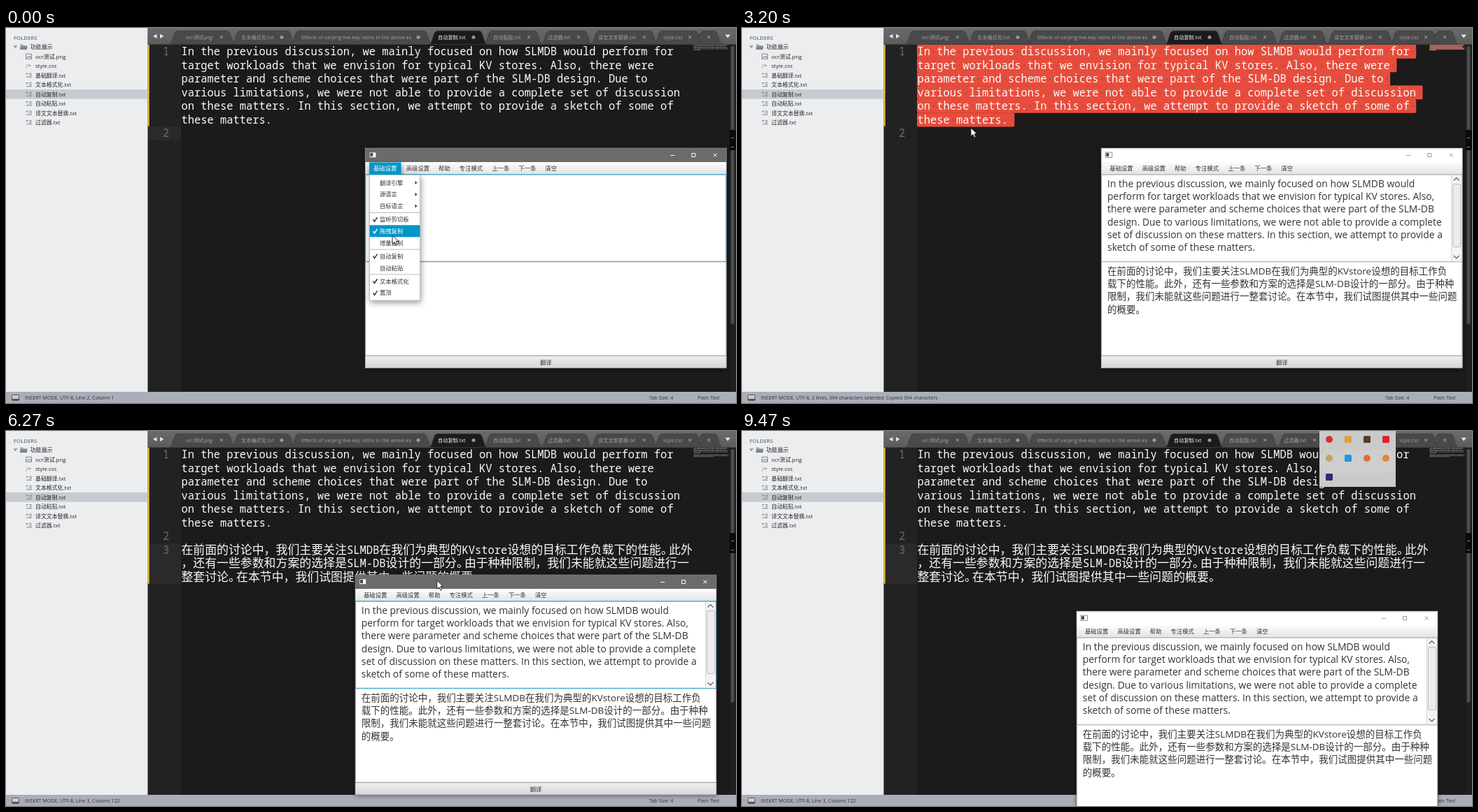
An HTML page that plays this animation: 1043 px wide and 537 px high, repeating every 9590 ms.

```html
<!DOCTYPE html>
<html lang="zh-CN">
<head>
<meta charset="utf-8">
<title>Auto copy demo</title>
<style>
html, body { margin: 0; width: 100%; height: 100%; overflow: hidden; background: #1b1b1b; }
svg { display: block; width: 1043px; height: 537px; }
text { font-family: "Open Sans", "Noto Sans CJK SC", "Noto Sans CJK JP", sans-serif; white-space: pre; }
.mono { font-family: "Noto Sans Mono", "DejaVu Sans Mono", monospace; }
.cjk { font-family: "Noto Sans CJK SC", "Noto Sans CJK JP", sans-serif; }
#win { filter: drop-shadow(0 1px 3px rgba(0,0,0,.45)); }
#menu { filter: drop-shadow(1px 3px 4px rgba(0,0,0,.4)); }
.line { fill: none; }
</style>
</head>
<body>
<svg viewBox="0 0 1043 537" xmlns="http://www.w3.org/2000/svg">
  <defs>
    <linearGradient id="bar" x2="0" y2="1"><stop stop-color="#fdfdfd"/><stop offset="1" stop-color="#e2e2e2"/></linearGradient>
    <linearGradient id="btn" x2="0" y2="1"><stop stop-color="#efefef"/><stop offset="1" stop-color="#d6d6d6"/></linearGradient>
    <linearGradient id="strip" x2="0" y2="1"><stop stop-color="#6a6a6a"/><stop offset="1" stop-color="#5c5c5c"/></linearGradient>
    <path id="stem" d="M-3-6h2q1 0 1 1v10q0 1 1 1h2M3-6h-2q-1 0-1 1M-3 6h2q1 0 1-1"/>
  </defs>

  <g id="editor">
    <rect x="203" y="23" width="840" height="498" fill="#1b1b1b"/>
    <rect x="203" y="23" width="47" height="498" fill="#222"/>
    <rect id="gutterRow" x="203" width="47" fill="#2a2a2a"/>
    <rect id="changed" x="202.5" y="24" width="2.2" fill="#e8b92e"/>
    <rect x="1034" y="23" width="9" height="498" fill="#1f1f1f"/>
    <rect id="thumb" x="1035.5" y="26" width="5" rx="2" fill="#4b4b4b"/>
    <rect x="1034" y="146" width="9" height="29" fill="#0b0b0b"/>
    <path stroke="#c8763a" d="M1036 157.5h4"/>
    <path stroke="#6f8f3a" d="M1036 170.5h4"/>
    <g id="rows"></g>
    <g id="pasted"></g>
    <rect id="caret" width="1.2" height="19" fill="#f5f5f5"/>
  </g>
  <g id="tabs"></g>
  <g id="side"></g>
  <g fill="#2e3136" font-size="7.1">
    <rect y="521" width="1043" height="16" fill="#a9aeb9"/>
    <rect x="8.5" y="525.5" width="10" height="8" rx="1" fill="#c9ccd3" stroke="#555"/>
    <rect x="9" y="531" width="9" height="2" fill="#555"/>
    <text id="status" x="27" y="532"></text>
    <text x="919" y="532">Tab Size: 4</text>
    <text x="988" y="532">Plain Text</text>
  </g>

  <g id="win">
    <rect width="516" height="315" fill="#fff"/>
    <rect id="title" width="516" height="20"/>
    <rect x="6" y="6" width="9.5" height="7.5" fill="#fff" stroke="#777" stroke-width=".8"/>
    <rect x="7" y="7" width="4" height="5" fill="#3d5560"/>
    <path id="buttons" class="line" d="M436 10.5h6M466.5 7.5h5v5h-5zM497.5 7.5l5 5m0-5l-5 5"/>
    <rect y="20" width="516" height="18" fill="url(#bar)"/>
    <g id="menubar"></g>
    <rect x=".5" y="163" width="515" height="134" class="line" stroke="#c4c4c4"/>
    <rect id="field" x=".5" y="37.8" width="515" height="124.5" class="line"/>
    <g font-size="13.5" fill="#b3b3b3">
      <text id="hintTop" x="8.8" y="56.5">原文</text>
      <text id="hintLow" x="8.8" y="181">译文</text>
    </g>
    <g id="before"></g>
    <g id="after"></g>
    <rect id="inputCaret" x="8.6" y="41.5" width="1" height="18.5" fill="#222"/>
    <rect y="297.5" width="516" height="17.5" fill="url(#btn)"/>
    <path stroke="#a5a5a5" d="M0 297.5h516"/>
    <text x="258" y="309.5" font-size="8.4" fill="#333" text-anchor="middle">翻译</text>
    <rect width="516" height="315" class="line" stroke="#8a8a8a" stroke-opacity=".7"/>
  </g>
  <g id="menu"></g>
  <g id="tray"></g>
  <path id="arrow" d="M0 0v12.200l3-2.700 2 4.500 2-1-2-4.300h4z" fill="#fff" stroke="#111" stroke-width=".9"/>
  <g id="beam" fill="none">
    <use href="#stem" stroke="#111" stroke-width="2.2"/>
    <use href="#stem" stroke="#fff"/>
  </g>
</svg>
<script>
const LOOP = 9590, TICK = 1000 / 15, PITCH = 19.55, CHAR = 9.257, LEFT = 250.4;
const $ = id => document.getElementById(id);
const txt = (x, y, size, fill, s, more = '') =>
  `<text x="${x}" y="${y}" font-size="${size}" fill="${fill}" xml:space="preserve" ${more}>${s}</text>`;
const box = (x, y, w, h, fill, more = '') =>
  `<rect x="${x}" y="${y}" width="${w}" height="${h}" fill="${fill}" ${more}/>`;
const path = (d, stroke, more = '') => `<path d="${d}" fill="none" stroke="${stroke}" ${more}/>`;
const rowTop = i => 24 + PITCH * i;
const base = i => rowTop(i) + 15;
const mapTop = i => 24 + 1.42 * i;

// Editor text
const rows = [
  'In the previous discussion, we mainly focused on how SLMDB would perform for ',
  'target workloads that we envision for typical KV stores. Also, there were ',
  'parameter and scheme choices that were part of the SLM-DB design. Due to ',
  'various limitations, we were not able to provide a complete set of discussion ',
  'on these matters. In this section, we attempt to provide a sketch of some of ',
  'these matters. '
];
const code = (x, i, fill, s) => txt(x, base(i), 15.43, fill, s, 'class="mono"');
const words = (row, i) => [...row.matchAll(/\S+/g)]
  .map(m => box(982.5 + m.index * .64, mapTop(i), m[0].length * .64, .8, '#777')).join('');
const number = (n, i) => code(224, i, '#6c6c6c', n);

$('rows').innerHTML = rows.map((row, i) =>
  `<g class="sel">${box(250, rowTop(i) - .3, row.length * CHAR + .4, PITCH + .4, '#e74c3c', 'rx="2"')}` +
  code(LEFT, i, '#8a5048', row.replace(/./g, c => c === ' ' ? '·' : ' ')) +
  box(982.5, mapTop(i) - .3, row.length * .64, 1.42, '#e0604f') + '</g>' +
  code(LEFT, i, '#fafafa', row) + words(row, i)
).join('') + number(1, 0) + number(2, 6) + `<g id="third">${number(3, 7)}</g>`;

const pasted = [
  '在前面的讨论中，我们主要关注SLMDB在我们为典型的KVstore设想的目标工作负载下的性能。此外',
  '，还有一些参数和方案的选择是SLM-DB设计的一部分。由于种种限制，我们未能就这些问题进行一',
  '整套讨论。在本节中，我们试图提供其中一些问题的概要。'
];
$('pasted').innerHTML = pasted.map((line, n) => {
  const i = n + 7;
  let x = LEFT, out = '';
  for (const [run] of line.matchAll(/[\w-]+|。|[^\w。-]+/g)) {
    const latin = /\w/.test(run);
    out += latin ? code(x, i, '#fafafa', run) : txt(x, base(i), 16.9, '#fafafa', run, 'class="cjk"');
    x += latin ? run.length * CHAR : run === '。' ? 11 : run.length * 16.9;
  }
  return out + path(`M982.5 ${mapTop(i)}h${(x - LEFT) * .068}`, '#777', 'stroke-width=".8" stroke-dasharray="9 .6"');
}).join('');

// Tabs: left edge, label x, label, mark x, unsaved
const tabs = [
  [234, 257, 'ocr测试.png', 308], [323, 336, '文本格式化.txt', 394, true],
  [407, 422, 'Effects of varying live-key ratios In the above ex', 589, true],
  [683, 696, '自动粘贴.txt', 747], [765, 774, '过滤器.txt', 818],
  [836, 846, '译文文本替换.txt', 912], [985, 990, '~', 1004],
  [926, 939, 'style.css', 977], [605, 617, '自动复制.txt', 668, true]
];
$('tabs').innerHTML = box(203, 0, 840, 23.5, 'url(#strip)') +
  '<path d="M215.500 8.500v6.500l-5.500-3.200zM220 8.500v6.500l5.500-3.200z" fill="#e3e3e3"/>' +
  tabs.map(([l, x, s, mark, dirty], i) => {
    const on = i === tabs.length - 1, r = mark + 19;
    return `<path d="M${l} 23.500C${l + 5} 21 ${l + 5} 4 ${l + 11} 4H${r - 11}C${r - 5} 4 ${r - 5} 21 ${r} 23.500z" fill="${on ? '#1b1b1b' : '#494949'}" stroke="#3a3a3a" stroke-width=".6"/>` +
      txt(x, 16, 7.2, on ? '#f2f2f2' : '#a3a3a3', s, i ? '' : 'font-style="italic"') +
      (dirty ? `<circle cx="${mark}" cy="13.200" r="2.500" fill="#999"/>` : path(`M${mark - 2} 11l4 4m0-4l-4 4`, '#a3a3a3'));
  }).join('') + '<path d="M1027.500 9.500h7.500l-3.800 5z" fill="#e8e8e8"/>';

// Sidebar
const files = ['ocr测试.png', 'style.css', '基础翻译.txt', '文本格式化.txt', '自动复制.txt', '自动粘贴.txt', '译文文本替换.txt', '过滤器.txt'];
const fileIcon = (i, y) => i === 1 ? txt(28.5, y + 3, 8, '#74777c', '/*')
  : path(i ? `M28.500 ${y - 2.5}h3m1.500 0h4m-7 0v2m3 .5h4m-8 2.500h8` : `M28.500 ${y - 3.5}h8v7h-8zm1 6l2-3 1.500 2 1.500-2 1.500 3`,
    '#74777c', 'stroke-width=".9"');
$('side').innerHTML = box(0, 0, 202.5, 521, '#ebedef') + box(0, 88, 202.5, 13.5, '#c7cad1') +
  txt(11, 17, 7.7, '#70747b', 'FOLDERS', 'font-weight="600"') +
  '<path d="M10.500 25h6l-3 4.500z" fill="#9a9da3"/><path d="M20 31v-7.500h4l1 1.500h5v6z" fill="#a3a6ab"/><path d="M19.500 31l2-4.500h9.500l-1.500 4.500z" fill="#808389"/>' +
  txt(34.5, 30, 8.1, '#26282b', '功能展示') +
  files.map((name, i) => fileIcon(i, 40.7 + 13.5 * i) + txt(42, 43.7 + 13.5 * i, 7.9, '#26282b', name)).join('');

// Translator window
const bar = ['基础设置', '高级设置', '帮助', '专注模式', '上一条', '下一条', '清空'];
let barX = 12;
$('menubar').innerHTML = bar.map(s => {
  const label = txt(barX, 32.3, 8.35, '#333', s);
  barX += s.length * 8.35 + 13;
  return label;
}).join('') + path('M0 38h516', '#b5b5b5');

const english = [
  'In the previous discussion, we mainly focused on how SLMDB would',
  'perform for target workloads that we envision for typical KV stores. Also,',
  'there were parameter and scheme choices that were part of the SLM-DB',
  'design. Due to various limitations, we were not able to provide a complete',
  'set of discussion on these matters. In this section, we attempt to provide a',
  'sketch of some of these matters.'
];
const chinese = [
  '在前面的讨论中，我们主要关注SLMDB在我们为典型的KVstore设想的目标工作负',
  '载下的性能。此外，还有一些参数和方案的选择是SLM-DB设计的一部分。由于种种',
  '限制，我们未能就这些问题进行一整套讨论。在本节中，我们试图提供其中一些问题',
  '的概要。'
];
const para = (lines, y, size) => lines.map((s, i) => txt(8.8, y + 18.2 * i, size, '#333', s)).join('');
$('before').innerHTML = para(english, 56, 13.88) +
  box(500, 39, 15, 123, '#f4f4f4') + path('M500.500 39v123', '#d5d5d5') +
  box(502.5, 51.5, 11, 90, '#ececec', 'stroke="#bdbdbd" rx="1.500"') +
  path('M503.500 46.500l4-4 4 4M503.500 154l4 4 4-4', '#555', 'stroke-width="1.1"');
$('after').innerHTML = para(chinese, 181, 13.5);

// Drop-down: > opens a submenu, + is checked, groups are split by |
const groups = '>翻译引擎 >源语言 >目标语言|+监听剪切板 +拖拽复制 -增量复制|+自动复制 -自动粘贴|+文本格式化 +置顶';
let itemY = 221.5;
const item = s => {
  const y = itemY;
  itemY += 16.8;
  return `<g class="item">${box(519.5, y - 8.6, 72, 17, '#0096c9')}` +
    txt(534, y + 3.1, 8.3, 'currentColor', s.slice(1)) +
    (s[0] === '+' ? path(`M524.500 ${y}l2 3 4-6`, 'currentColor', 'stroke-width="1.5"') : '') +
    (s[0] === '>' ? `<path d="M584.500 ${y - 2.5}v5l3-2.500z" fill="#333"/>` : '') + '</g>';
};
$('menu').innerHTML = box(519, 192.5, 45.5, 17.5, '#0096c9') + txt(525, 204.3, 8.35, '#fff', bar[0]) +
  box(519.5, 210.5, 72, 179.5, '#fff', 'stroke="#c2c2c2"') +
  groups.split('|').map((group, i) => {
    if (i) itemY += 2.2;
    return (i ? path(`M520 ${itemY - 9.6}h71`, '#bcbcbc') : '') + group.split(' ').map(item).join('');
  }).join('');

// Tray popup with plain icons
const icons = 'o#d93030 s#e0a33c s#5a3a32 s#e0232e o#c9a15c s#2196e3 o#e07030 o#e8842c s#2b2f6b'.split(' ');
$('tray').innerHTML = box(825, 0, 109, 80, '#cacaca') + box(826, 27, 107, 34, '#d3d3d3', 'rx="12" opacity=".5"') +
  '<rect id="cell" width="26" height="26" fill="#e6e6e6"/>' +
  icons.map((c, i) => box(834 + i % 4 * 27, 7 + (i >> 2) * 27, 10, 10, c.slice(1), `rx="${c[0] === 'o' ? 5 : 1.5}"`)).join('');

// Pointer path: time, x, y
const trail = [
  [0, 552, 297], [530, 552, 333], [1000, 549, 325], [1130, 441, 278], [1330, 427, 266],
  [1600, 262, 152], [1930, 252, 134], [2200, 226, 30], [2400, 226, 20], [3200, 327, 143],
  [3340, 327, 143], [3600, 270, 151], [4330, 311, 255], [5270, 311, 255], [5530, 539, 209],
  [6070, 628, 184], [6200, 628, 184], [6400, 593, 270], [6530, 630, 205], [6800, 520, 138],
  [6930, 437, 200], [7600, 561, 469], [7870, 561, 469], [8000, 866, 30], [9000, 881, 24], [9270, 842, 8]
];
const shapes = [
  [0, 'arrow'], [1130, 'beam'], [2470, 'arrow'], [3400, 'beam'], [5530, 'arrow'], [6530, 'beam'],
  [7670, ''], [7870, 'beam'], [7930, 'arrow'], [8070, ''], [9000, 'arrow'], [9330, '']
];
const last = (keys, t) => keys.reduce((now, k) => k[0] <= t ? k : now);
const show = (id, on) => $(id).style.display = on ? '' : 'none';
const set = (id, attrs) => { for (const k in attrs) $(id).setAttribute(k, attrs[k]); };
const sels = document.querySelectorAll('.sel'), entries = document.querySelectorAll('.item');

function drawEditor(t) {
  const from = last([[0, 6], [1670, 5], [2070, 2], [2200, 1], [2330, 0], [3600, 6]], t)[1];
  const stage = t < 4600 ? 0 : t < 5070 ? 1 : 2;
  const line = stage ? 7 : 6, atWrap = from === 1;
  sels.forEach((g, i) => g.style.display = i >= from ? '' : 'none');
  show('gutterRow', from === 6);
  set('gutterRow', { y: rowTop(line), height: PITCH * (stage < 2 ? 1 : 3) });
  set('changed', { height: (6 + 2 * stage) * PITCH - .8 });
  set('thumb', { height: 398 - 17.5 * stage });
  show('third', stage > 0);
  show('pasted', stage > 1);
  show('caret', atWrap || t >= 3600 && stage < 2);
  set('caret', { x: atWrap ? 962.3 : 250, y: rowTop(atWrap ? 0 : line) });
  const count = rows.slice(from).join('').length;
  const place = from < 6 ? `2 lines, ${count} characters selected`
    : `Line ${stage ? 3 : 2}, Column ${stage < 2 ? 1 : 122}`;
  $('status').textContent = 'INSERT MODE, UTF-8, ' + place + (t >= 2470 && t < 6270 ? '; Copied 394 characters' : '');
}

function drawWindow(t) {
  const open = t < 1530, active = open || t >= 6270 && t < 8800;
  const [, x, y] = last([[0, 513.3, 172], [6270, 499, 206], [6400, 478, 258]], t);
  set('win', { transform: `translate(${x} ${y})` });
  set('title', { fill: active ? '#6b6b6b' : '#fff' });
  set('buttons', { stroke: active ? '#fff' : '#9a9a9a' });
  set('field', { stroke: active ? '#26a5d3' : '#b9b9b9' });
  show('hintTop', t < 2670);
  show('before', t >= 2670);
  show('hintLow', t < 2870);
  show('after', t >= 2870);
  show('inputCaret', active && !open && Math.floor((t - 6390) / 533) % 2 === 0);

  show('menu', open);
  const hot = last([[0, 4], [200, 5], [400, 6]], t)[1];
  entries.forEach((g, i) => {
    g.style.color = i === hot ? '#fff' : '#333';
    g.firstChild.style.display = i === hot ? '' : 'none';
  });
  show('tray', t >= 8800);
  show('cell', t >= 9000 && t < 9470);
  set('cell', t < 9270 ? { x: 853, y: 26 } : { x: 826, y: 0 });
}

function drawPointer(t) {
  const a = last(trail, t), b = trail[trail.indexOf(a) + 1] || a;
  const p = b === a ? 0 : (t - a[0]) / (b[0] - a[0]);
  const shape = last(shapes, t)[1];
  show('arrow', shape === 'arrow');
  show('beam', shape === 'beam');
  if (shape) set(shape, { transform: `translate(${a[1] + (b[1] - a[1]) * p} ${a[2] + (b[2] - a[2]) * p})` });
}

const start = performance.now();
function frame() {
  const now = (performance.now() - start) % LOOP;
  const t = Math.round(Math.floor((now + 4) / TICK) * TICK / 10) * 10;
  drawEditor(t);
  drawWindow(t);
  drawPointer(t);
  requestAnimationFrame(frame);
}
frame();
</script>
</body>
</html>
```
